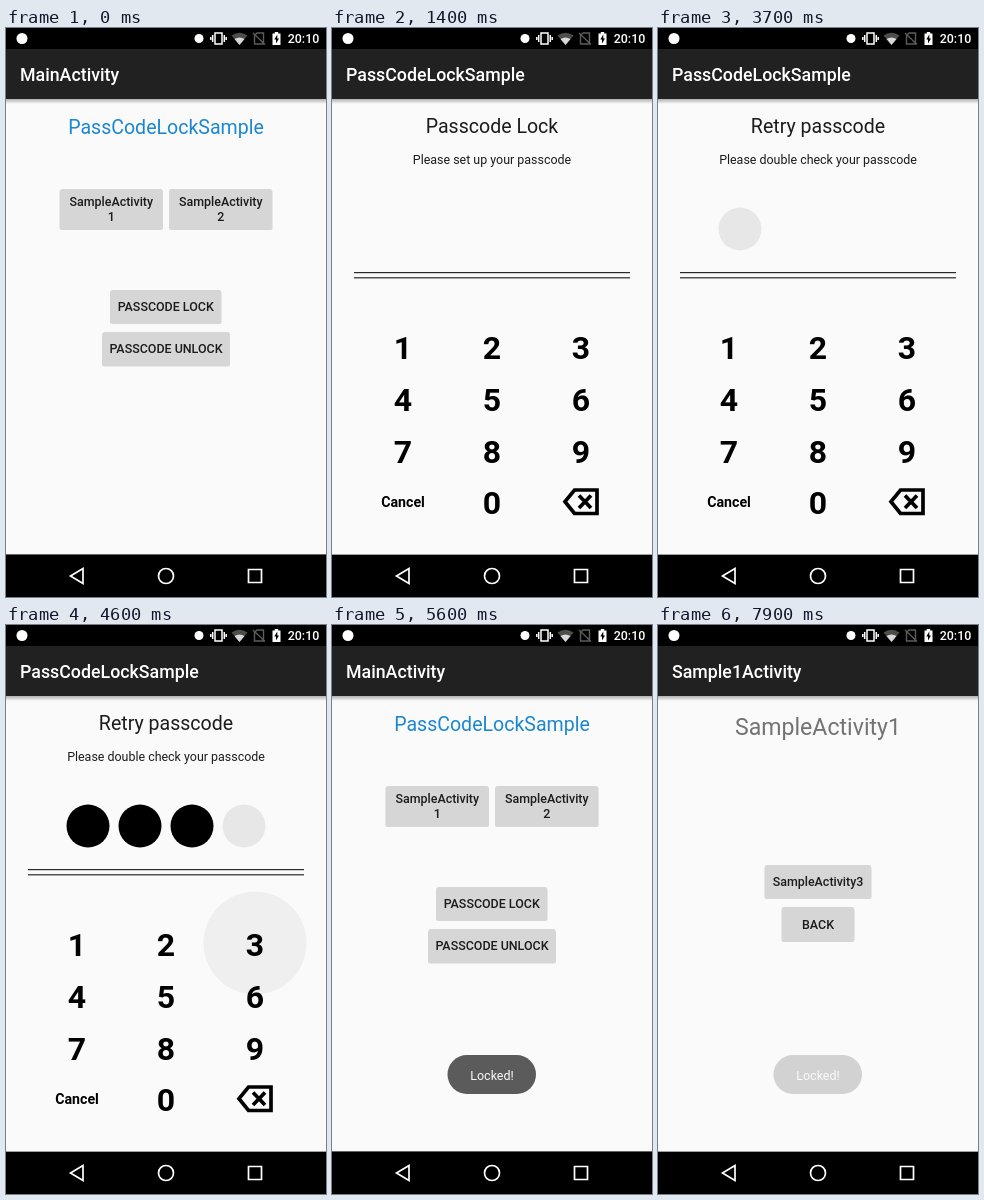
An HTML page that plays this animation: 320x569 px, repeating every 8 s.

```html
<!DOCTYPE html>
<html lang="en">
<head>
<meta charset="utf-8">
<title>Passcode lock demo</title>
<style>
html, body { margin: 0; width: 100%; height: 100%; overflow: hidden; background: #000; }
svg { display: block; width: 100%; height: 100%; font-family: Roboto, sans-serif; }
.mid { text-anchor: middle; }
.medium { font-weight: 500; }
.bold { font-weight: 700; }
</style>
</head>
<body>
<svg id="stage" viewBox="0 0 320 569">
  <defs>
    <linearGradient id="shade" x2="0" y2="1">
      <stop stop-color="#000" stop-opacity=".3"/>
      <stop offset="1" stop-color="#000" stop-opacity="0"/>
    </linearGradient>
  </defs>
</svg>
<script>
const PAPER = '#fafafb', INK = '#1c1c1c';
const KEY_X = [71, 160, 249], KEY_Y = [320, 371.7, 423.4, 475];

const text = (x, y, size, str, fill = INK, cls = 'mid') =>
  `<text x="${x}" y="${y}" font-size="${size}" fill="${fill}" class="${cls}">${str}</text>`;

const rect = (x, y, w, h, fill, rx = 0, extra = '') =>
  `<rect x="${x}" y="${y}" width="${w}" height="${h}" fill="${fill}" rx="${rx}" ${extra}/>`;

const button = (x, y, w, h, ...lines) =>
  rect(x - .5, y + 1, w + 1, h, '#808080', 2, 'opacity=".3"') + rect(x, y, w, h, '#d6d6d7', 2) +
  lines.map((line, i) => text(x + w / 2, y + h / 2 + 4.5 + (i - (lines.length - 1) / 2) * 14.6,
    12.44, line, INK, 'mid medium')).join('');

const page = (id, title, body) => `<g id="${id}">
  ${rect(0, 21, 320, 505.4, PAPER)}${body}
  ${rect(0, 71, 320, 5, 'url(#shade)')}${rect(0, 21, 320, 50, '#212121')}
  ${text(14, 53, 17.78, title, '#fff', 'medium')}</g>`;

const mainPage = page('main', 'MainActivity',
  text(160, 106, 19.56, 'PassCodeLockSample', '#1b87cf') +
  button(54, 161, 102.5, 40, 'SampleActivity', '1') +
  button(163.5, 161, 102.5, 40, 'SampleActivity', '2') +
  button(104.5, 262, 110.5, 33, 'PASSCODE LOCK') +
  button(96.5, 304, 127, 33.5, 'PASSCODE UNLOCK'));

const digits = [1, 2, 3, 4, 5, 6, 7, 8, 9].map((n, i) =>
  text(KEY_X[i % 3], KEY_Y[i / 3 | 0] + 11.4, 32, n, '#000', 'mid bold')).join('');

const lockPage = page('lock', 'PassCodeLockSample',
  [1, 2, 3, 4].map((n, i) => `<circle class="ripple" cx="${KEY_X[i % 3]}"
    cy="${KEY_Y[i / 3 | 0] - 2}" r="51.5" fill="#efefef"/>`).join('') +
  '<g id="heading"></g>' +
  [82, 134, 186, 238].map(x => `<circle class="dot" cx="${x}" cy="201" r="21.5"/>`).join('') +
  rect(22, 244, 276, 1.2, '#2a2a2a') + rect(22, 249.2, 276, 1.2, '#2a2a2a') + digits +
  text(160, 486.4, 32, '0', '#000', 'mid bold') +
  text(71, 479.3, 14.2, 'Cancel', '#000', 'mid bold') +
  `<path d="M233 473.7 242.5 462H265V485.5H242.5ZM247 467.5 259 480M259 467.5 247 480"
    fill="none" stroke="#000" stroke-width="3.7"/>`);

const samplePage = page('sample', 'Sample1Activity',
  text(160, 110, 23.1, 'SampleActivity1', '#737373') +
  button(107, 240, 106, 33, 'SampleActivity3') +
  button(124, 282, 72, 34, 'BACK'));

const toast = `<g id="toast">${rect(115.5, 430, 88.5, 39, '#5b5b5b', 19.5)}
  ${text(160, 454.6, 12.5, 'Locked!', '#fafafa')}</g>`;

const bars = `${rect(0, 0, 320, 21, '#000')}
  <circle cx="16" cy="10.5" r="5.5" fill="#fff"/>
  <circle cx="193" cy="10.5" r="4.5" fill="#fff"/>
  <path d="M209 5H216V16H209ZM206.7 7V14M218.3 7V14M204.8 9V12M220.2 9V12"
    fill="none" stroke="#fff" stroke-width="1.5"/>
  <path d="M225.5 7.5Q233.5 2 241.5 7.5L233.5 17Z" fill="#4d4d4d"/>
  <path d="M228.5 11 Q233.5 7.8 238.5 11L233.5 17Z" fill="#d8d8d8"/>
  <path d="M251 5H257.5V16H248.5V7.5ZM247 5 259 16.5" fill="none" stroke="#5c5c5c" stroke-width="1.4"/>
  <path d="M266.5 5.5H268.8V4H272.2V5.5H274.5V17H266.5Z" fill="#fff"/>
  <path d="M271.3 6.5 268.3 11.5H270V15.5L273 10.5H271.3Z" fill="#000"/>
  ${text(297.5, 15, 12.44, '20:10', '#fff', 'mid medium')}
  <g fill="none" stroke="#fff" stroke-width="1.7">
    <path d="M64.5 548 77 540.5V555.5ZM242.5 541.5H255.5V554.5H242.5Z"/>
    <circle cx="160" cy="548" r="7.5"/></g>`;

const stage = document.getElementById('stage');
stage.innerHTML += mainPage + lockPage + samplePage + toast + bars;

const el = id => document.getElementById(id);
const ripples = [...document.querySelectorAll('.ripple')];
const dots = [...document.querySelectorAll('.dot')];

const SLIDE = 45.5, RETRY = 3100;
const OPEN_LOCK = 740, CLOSE_LOCK = 5227, OPEN_SAMPLE = 6885;
const TAPS = [[1880, 2200, 2490, 2790], [3690, 4050, 4390, 4590]];

const ramp = (t, start, length) => Math.min(1, Math.max(0, (t - start) / length));

// New pages rise a little while fading in.
const enter = (t, start) => ({
  y: SLIDE * (1 - ramp(t, start, 1060)) ** 5,
  alpha: 1 - (1 - ramp(t, start, 600)) ** 4
});

const leave = t => ({
  y: SLIDE * ramp(t, CLOSE_LOCK, 317) ** 4,
  alpha: 1 - ramp(t, CLOSE_LOCK + 127, 190)
});

function place(id, { y, alpha }) {
  // Whole pixels keep the text and edges crisp.
  el(id).setAttribute('transform', `translate(0 ${Math.round(y)})`);
  el(id).setAttribute('opacity', alpha);
}

let shownHeading;
function setHeading(retry) {
  if (retry === shownHeading) return;
  shownHeading = retry;
  el('heading').innerHTML =
    text(160, 105, 19.56, retry ? 'Retry passcode' : 'Passcode Lock') +
    text(160, 136.3, 12.44, retry ? 'Please double check your passcode' : 'Please set up your passcode');
}

function draw(t) {
  place('lock', t < CLOSE_LOCK ? enter(t, OPEN_LOCK) : leave(t));
  place('sample', enter(t, OPEN_SAMPLE));
  el('toast').setAttribute('opacity', ramp(t, 5350, 250) * (1 - ramp(t, 7600, 400)));

  const retry = t >= RETRY;
  setHeading(retry);
  dots.forEach((dot, i) => dot.setAttribute('opacity', ramp(t, TAPS[+retry][i], 150)));
  ripples.forEach((ripple, i) => {
    const glow = TAPS.map(taps => ramp(t, taps[i] + 185, 15) * (1 - ramp(t, taps[i] + 300, 180)));
    ripple.setAttribute('opacity', Math.max(...glow));
  });
}

const origin = performance.now();
function tick() {
  draw((performance.now() - origin) % 8000);
  requestAnimationFrame(tick);
}
tick();
</script>
</body>
</html>
```
